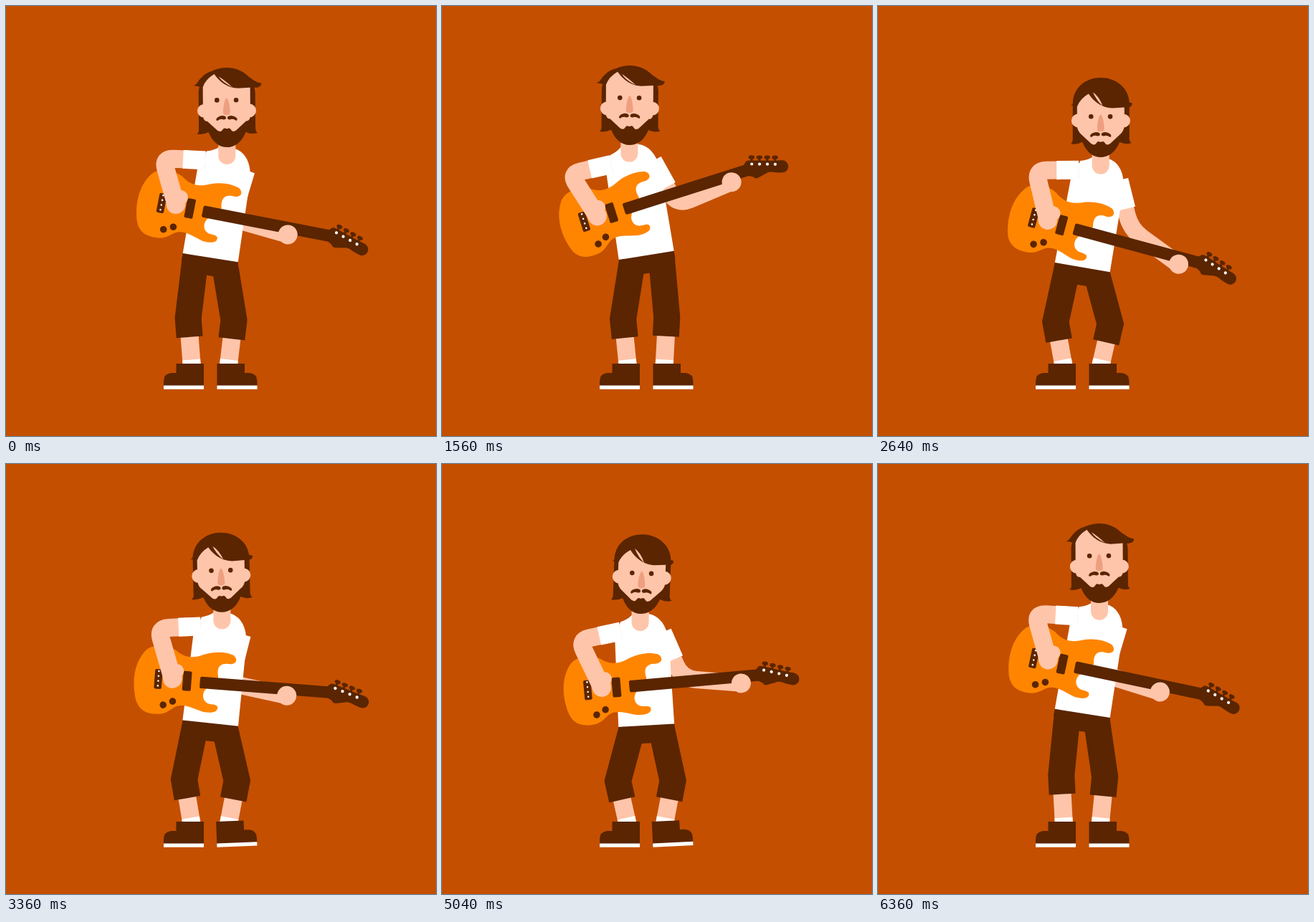
Animation of 600x600 px, one loop 6.4 s. Source, as an HTML page:

```html
<!DOCTYPE html>
<html lang="en">
<head>
<meta charset="utf-8">
<title>Guitarist</title>
<style>
  html, body { margin: 0; width: 100%; height: 100%; overflow: hidden; background: #c44f00; }
  svg { display: block; width: 100vw; height: 100vh; }
  .dark { fill: #5a2500; }
  .skin { fill: #ffc5aa; }
  .white { fill: #fff; }
  .limb { fill: none; stroke: #ffc5aa; stroke-width: 25; }
  .cloth { fill: none; stroke: #fff; stroke-width: 25; }
  .pants { fill: none; stroke: #5a2500; stroke-width: 37; }
</style>
</head>
<body>
<svg viewBox="0 0 600 600">
  <defs>
    <g id="shoe">
      <path class="dark" d="M294.5 499H333V512H340Q350.5 513 350.5 524V530H294.5Z"/>
      <path class="white" d="M294.5 529.5H350.5V534.8H294.5Z"/>
    </g>
    <path id="whisker" class="dark" d="M-14 28.5Q-16 26-12 23.5Q-7 20.5-2.5 22.5Q0 24-1.5 26.5Q-4 28-7 26.5Q-10 26.5-12 28Q-13 29-14 28.5Z"/>
  </defs>
  <rect width="600" height="600" fill="#c44f00"/>

  <path id="shinL" class="limb"/><path id="sockL" class="cloth"/><path id="legL" class="pants"/>
  <path id="shinR" class="limb"/><path id="sockR" class="cloth"/><path id="legR" class="pants"/>
  <use href="#shoe" transform="translate(570.5 0) scale(-1 1)"/>
  <use id="footR" href="#shoe"/>

  <path id="armR" class="limb" style="stroke-width:24"/>
  <path id="sleeveR" class="cloth" style="stroke-width:28"/>
  <g id="torso">
    <path class="dark" d="M-39-1H39V10L12 25H-12L-39 10Z"/>
    <path class="white" d="M-39 0L-37-120L-28-146Q-17-149-11-155H13Q34-149 38-118L39 0Z"/>
  </g>
  <rect id="neck" class="skin" x="-12" y="-26" width="24" height="44" rx="12"/>

  <g id="guitar">
    <path fill="#ff8500" d="M-82-34C-74-48-54-50-37-42C-24-32-12-32 3-39C18-45 34-45 44-41C52-35 48-27 36-28.5
      C24-28 22-20 25-9L9 9C4 15 5 24 11 27.5C16 31 24 28 27 32C29 40 20 42 8 41C-6 38-18 31-30 36
      C-38 40-40 46-52 48.5C-75 51-86 43-90 21C-95-3-90-22-82-34Z"/>
    <g class="dark">
      <rect x="-24" y="-14" width="12" height="27.5" rx="2"/>
      <rect x="-63.5" y="-13.7" width="10.5" height="27.5" rx="2"/>
      <circle cx="-36" cy="29.5" r="4.8"/><circle cx="-48.8" cy="35.6" r="4.8"/>
      <rect x="0" y="-8" width="190" height="16.5" rx="2.5"/>
    </g>
    <g id="bridge"></g>
    <g transform="translate(189 -6) rotate(16)">
      <path class="dark" d="M-11 1L-8-4Q-6-5-3-5L32-4Q36-4 42-4V13Q33 13 29 12Q23 11 19 14L8 19.5Q4 21 2 18L-6 16Z"/>
      <circle class="dark" cx="42.5" cy="4.5" r="8.5"/>
      <g id="pegs"></g>
    </g>
  </g>

  <path id="armL" class="limb"/>
  <path id="sleeveL" class="cloth" style="stroke-width:26"/>
  <g id="hands" class="skin">
    <circle cx="-38.5" cy="-2" r="13.3"/><circle cx="-33.5" cy="-13" r="10"/>
    <circle id="fretHand" cy="9.5" r="13.5"/>
  </g>

  <g id="head">
    <path class="dark" d="M-39 26V-25C-38-47-20-60 0-60S39-47 40-25V26Q41 31 43.500 31Q35 34 27 30H-26Q-34 34-42 32Q-39 31-39 26Z"/>
    <path class="dark" d="M-33 10L-25 31C-19 45-10 51 0 51S20 45 26 31L34 10Z"/>
    <path id="fringe" class="dark" d="M-42-22C-36-24-36-30-30-35C-20-47 10-48 28-34C36-28 38-26 44-25C44-20 40-18 33-19L-33-20Q-37-22-42-22Z"/>
    <path id="face" class="skin"/>
    <path id="parting" class="skin"/>
    <circle class="skin" cx="-31.5" r="9.4"/><circle class="skin" cx="31.8" r="9.4"/>
    <g id="features">
      <circle class="dark" cx="-13.5" r="3.3"/><circle class="dark" cx="13.3" r="3.3"/>
      <path fill="#ee9f80" d="M0-3C3-2 5 12 5 17Q5 21 0 21T-5 17C-5 12-3-2 0-3Z"/>
      <use href="#whisker"/><use href="#whisker" transform="scale(-1 1)"/>
    </g>
  </g>
</svg>
<script>
const LOOP = 6400, SWAY = 3200, BEAT = 800;
const { PI, sin, cos, tanh, abs, hypot, sqrt, max } = Math;
const $ = id => document.getElementById(id);
const set = (id, value, attr = 'd') => $(id).setAttribute(attr, value);
const place = (id, [x, y], angle = 0) => set(id, `translate(${x} ${y}) rotate(${angle})`, 'transform');
const line = (...points) => 'M' + points.join('L');
const repeat = (n, draw) => Array.from({ length: n }, (_, i) => draw(i)).join('');

// Motion: a bounce on every beat, and a sway that rests at both ends.
const bounce = t => 21 * abs(sin(PI * (t - 722) / BEAT));
const sway = (t, middle, hold) => tanh(hold * sin(2 * PI * (t - middle) / SWAY));
const lean = t => -9.9 * sway(t, 310, 2.55);
const guitarAngle = t => -2.8 - 19 * sway(t, 275, 1.8);
const guitarY = t => -66.7 + 0.68 * bounce(t - 60) + 0.35 * lean(t);
const fretSlide = t => 139 + 17 * sway(t, 1280, 3);
const nod = t => -5.5 - 9.5 * cos(PI * (t - 780) / BEAT) ** 6;
const headTilt = t => -3 * cos(2 * PI * (t - 400) / SWAY) * (1 - sway(t, 400, 2) ** 2);
const tap = t => 3 * max(0, sin(PI * (t % 1600) / 600)) * (t % 1600 < 600);

const toward = (a, b, dist) => {
  const k = dist / hypot(b[0] - a[0], b[1] - a[1]);
  return [a[0] + (b[0] - a[0]) * k, a[1] + (b[1] - a[1]) * k];
};
// Maps points of a frame at an origin, turned by degrees, to the stage.
const frame = ([ox, oy], degrees) => {
  const a = degrees * PI / 180, c = cos(a), s = sin(a);
  return (x, y) => [ox + x * c - y * s, oy + x * s + y * c];
};
function elbowOf([x, y], [hx, hy], upper, fore) {
  const dx = hx - x, dy = hy - y, d = hypot(dx, dy);
  const along = (upper * upper + d * d - fore * fore) / (2 * d);
  const off = sqrt(max(0, upper * upper - along * along));
  return [x + (dx * along - dy * off) / d, y + (dy * along + dx * off) / d];
}

function drawArm(side, shoulder, elbow, hand, sleeve, bend) {
  set('arm' + side, `${line(shoulder, toward(elbow, shoulder, bend))}Q${elbow} ${toward(elbow, hand, bend)}L${hand}`);
  set('sleeve' + side, line(shoulder, toward(shoulder, elbow, sleeve)));
}

function drawLeg(side, hip, knee, ankle) {
  set('leg' + side, line(hip, knee, toward(knee, ankle, 26.5)));
  set('shin' + side, line(knee, ankle));
  set('sock' + side, line(toward(ankle, knee, 11.5), ankle));
}

function drawHead(t, neck) {
  const eye = nod(t), lift = (eye + 6) * 1.5, spread = 1 - (eye + 6) * 0.012;
  const jaw = 31 + (eye + 8) * 0.5, y = v => v + lift;
  const tilt = headTilt(t);
  place('head', frame(neck, tilt)(0, -56.8), tilt);
  set('fringe', `translate(0 ${lift}) scale(${spread} 1)`, 'transform');
  place('features', [0, eye]);
  set('face', `M-33 8V${y(-20)}Q-29 ${y(-31)} -17 ${y(-38)}Q-4 ${y(-19)} 16 ${y(-18)}L33 ${y(-19)}V8
    Q32 15 27 ${jaw - 13}L13 ${jaw}Q8 ${jaw + 3} 6 ${jaw - 1}Q4 ${jaw - 4} 2 ${jaw - 3}Q0 ${jaw - 2} -2 ${jaw - 3}
    Q-4 ${jaw - 4} -6 ${jaw - 1}Q-8 ${jaw + 3} -13 ${jaw}L-27 ${jaw - 13}Q-32 15 -33 8Z`);
  const top = -40 + lift * 0.6, tip = -21 + lift * 0.9, end = 3 - lift * 0.4;
  set('parting', `M-11 ${top}Q-3 ${top + 5} ${end} ${tip}Q-5 ${tip - 6} -11 ${top}Z`);
}

function draw(time) {
  const t = time % SWAY, waist = [285.2, 344.7 + bounce(t)], tilt = lean(t);
  const torso = frame(waist, tilt);
  place('torso', waist, tilt);

  const hipL = torso(-20.5, 4), hipR = torso(20.5, 4);
  const dropL = hipL[1] - 348, dropR = hipR[1] - 348;
  drawLeg('L', hipL, [256 - dropL * 0.48, 434 + dropL * 0.39], [259.5, 505]);
  drawLeg('R', hipR, [313.5 + dropR * 0.44, 434 + dropR * 0.4], [310, 505]);
  set('footR', `rotate(${-tap(t)} 294.5 535)`, 'transform');

  const gy = guitarY(t), angle = guitarAngle(t), origin = torso(-20.7, gy);
  const guitar = frame(origin, angle), slide = fretSlide(t);
  place('guitar', origin, angle);
  place('hands', origin, angle);
  set('fretHand', slide, 'cx');

  const shoulderR = torso(29, -128), handR = guitar(slide, 9.5);
  drawArm('R', shoulderR, elbowOf(shoulderR, handR, 70, 83), handR, 41, 20);
  drawArm('L', torso(-28, -133), torso(-87, -126.5 + (gy + 62) * 0.4), guitar(-38.5, -2), 31, 15);

  const neck = torso(0, -150);
  place('neck', neck);
  drawHead(t, neck);
}

$('bridge').innerHTML = repeat(4, i => `<circle class="white" cx="-58.2" cy="${6.8 * i - 11}" r="1.3"/>`);
$('pegs').innerHTML = repeat(4, i => `<g transform="translate(${10.9 * i} ${0.4 * i})">
  <ellipse class="dark" cy="-9.5" rx="4.2" ry="2.7"/><rect class="dark" x="-1.5" y="-8" width="3" height="5"/>
  <circle class="white" r="2.1"/></g>`);

const start = performance.now();
function tick() {
  draw((performance.now() - start) % LOOP);
  requestAnimationFrame(tick);
}
tick();
</script>
</body>
</html>
```
